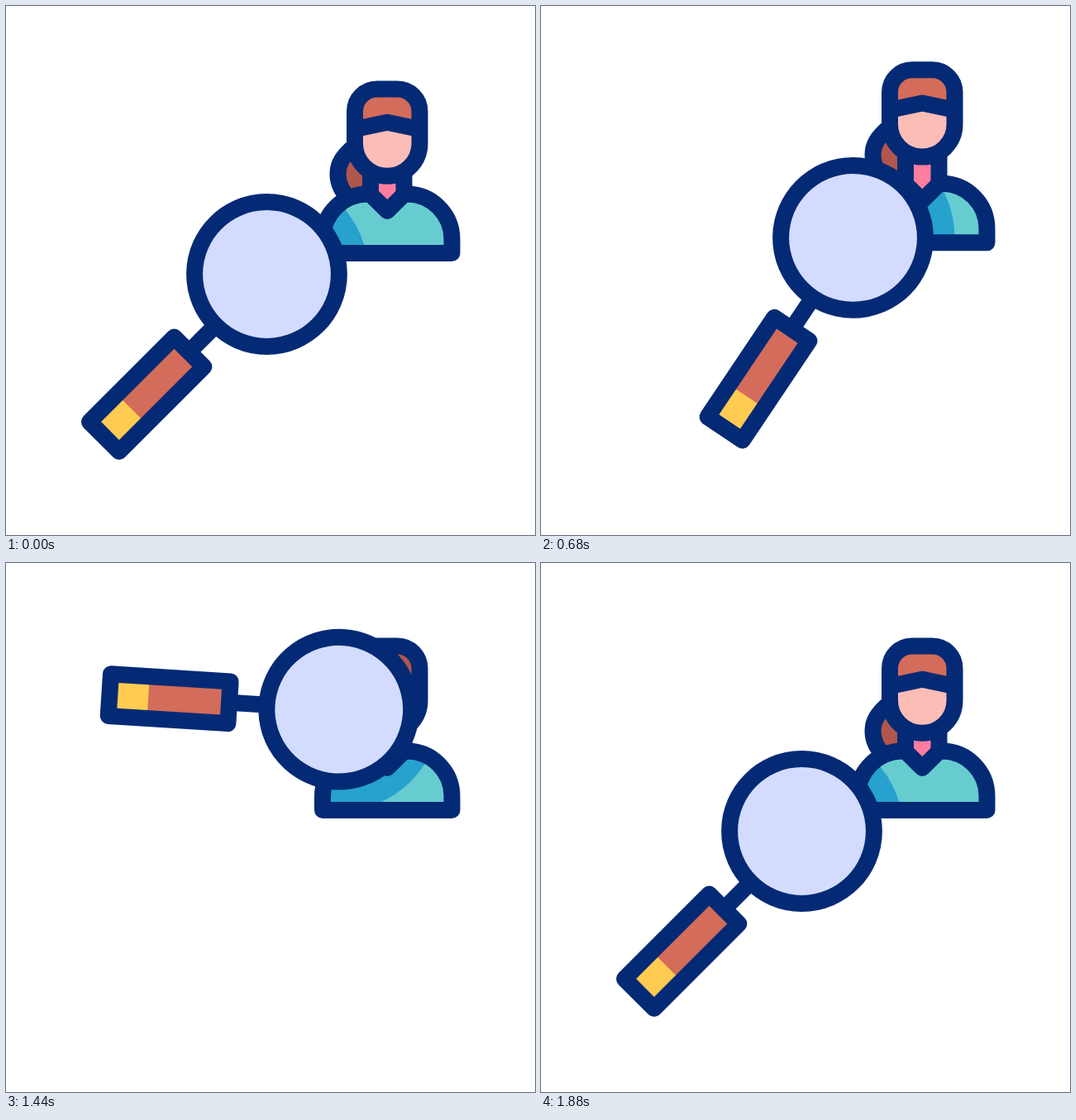
An HTML page with a canvas for the animation above (1920 ms loop, 640x640 px).

```html
<!DOCTYPE html>
<html lang="en">
<head>
<meta charset="utf-8">
<title>Search for a person</title>
<style>
  html, body { margin: 0; width: 100%; height: 100%; overflow: hidden; background: #fff; }
  canvas { display: block; width: 100vmin; height: 100vmin; }
</style>
</head>
<body>
<canvas id="stage"></canvas>
<script>
const LOOP = 1920;
const STEP = 40;
const SIZE = 640;
const SHADOW_RADIUS = 123;
const COLOR = {
  line: '#042a75', glass: '#d3dcfe', hair: '#d36c5a', hairDark: '#b0564c',
  skin: '#fdbdb7', skinDark: '#ff7d9f', shirt: '#67ccd0', shirtDark: '#27a1ce', cap: '#ffcb50'
};

const canvas = document.getElementById('stage');
const ctx = canvas.getContext('2d');

// Cubic Bezier easing with control points (x1, 0) and (x2, 1).
function ease(x, x1, x2) {
  let low = 0, high = 1;
  for (let i = 0; i < 24; i++) {
    const s = (low + high) / 2, r = 1 - s;
    if (3 * s * r * r * x1 + 3 * s * s * r * x2 + s * s * s < x) low = s; else high = s;
  }
  return low * low * (3 - 2 * low);
}

// Each segment: [start, end, from, to, x2 of the easing].
function valueAt(segments, time) {
  let value = segments[0][2];
  for (const [start, end, from, to, x2 = 0.33] of segments) {
    if (time < start) break;
    const k = time >= end ? 1 : ease((time - start) / (end - start), 0.42, x2);
    value = from.map((v, i) => v + (to[i] - v) * k);
  }
  return value;
}

// Glass poses: centre x, centre y, handle angle in degrees.
const CORNER = [315.5, 324.5, 45];
const CHEST = [377.5, 280.5, 56.2];
const FACE = [411, 163.3, -8.2];
const glassMotion = [
  [100, 400, CORNER, CHEST],
  [670, 1140, CHEST, FACE, 0.17],
  [1340, 1880, FACE, CORNER]
];

// Vertical offsets: head, body.
const personMotion = [
  [100, 400, [0, 0], [18.3, 12.9]],
  [400, 690, [18.3, 12.9], [-23.2, -12.7]],
  [690, 1000, [-23.2, -12.7], [0, 0]]
];

const tailPath = new Path2D('M421 170C407 182 401.5 191 401.5 203C401.5 216 407 224 414 232');
const tailFill = new Path2D('M421 170C407 182 401.5 191 401.5 203C401.5 216 407 224 414 232H445V170Z');
const neckFill = new Path2D('M441 170H481.5V228L461.25 248L441 228Z');
const neckLines = new Path2D('M441 170V228M481.5 170V228');
const bodyPath = new Path2D('M383 299V282A54.5 54.5 0 0 1 437.5 227.5H440.5L461.25 248L482 227.5H485' +
  'A54.5 54.5 0 0 1 539.5 282V299Z');
const headPath = new Path2D('M422 166.5V127.5A27 27 0 0 1 449 100.5H473.5A27 27 0 0 1 500.5 127.5' +
  'V166.5A39.25 39.25 0 0 1 422 166.5Z');
const hairFill = new Path2D('M422 127.5A27 27 0 0 1 449 100.5H473.5A27 27 0 0 1 500.5 127.5' +
  'V149L461.25 140.7L422 149Z');
const fringePath = new Path2D('M422 149L461.25 140.7L500.5 149');

function outline(path) {
  ctx.strokeStyle = COLOR.line;
  ctx.stroke(path);
}

function shadedFill(path, light, dark, shadow) {
  ctx.fillStyle = light;
  ctx.fill(path);
  ctx.save();
  ctx.clip(path);
  ctx.fillStyle = dark;
  ctx.beginPath();
  ctx.arc(shadow.x, shadow.y, SHADOW_RADIUS, 0, Math.PI * 2);
  ctx.fill();
  ctx.restore();
}

function shifted(dy, glass, draw) {
  ctx.save();
  ctx.translate(0, dy);
  draw({ x: glass[0], y: glass[1] - dy });
  ctx.restore();
}

function drawPerson(headY, bodyY, glass) {
  shifted(headY, glass, () => {
    ctx.fillStyle = COLOR.hairDark;
    ctx.fill(tailFill);
    outline(tailPath);
  });
  shifted(bodyY, glass, shadow => {
    ctx.fillStyle = COLOR.skinDark;
    ctx.fill(neckFill);
    outline(neckLines);
    shadedFill(bodyPath, COLOR.shirt, COLOR.shirtDark, shadow);
    outline(bodyPath);
  });
  shifted(headY, glass, shadow => {
    shadedFill(headPath, COLOR.skin, COLOR.skinDark, shadow);
    shadedFill(hairFill, COLOR.hair, COLOR.hairDark, shadow);
    outline(fringePath);
    outline(headPath);
  });
}

function drawGlass([x, y, angle]) {
  ctx.save();
  ctx.translate(x, y);
  ctx.rotate(-angle * Math.PI / 180);
  ctx.strokeStyle = COLOR.line;

  ctx.beginPath();
  ctx.moveTo(-90, 0);
  ctx.lineTo(-133, 0);
  ctx.stroke();

  ctx.fillStyle = COLOR.hair;
  ctx.fillRect(-278, -25.4, 145, 50.8);
  ctx.fillStyle = COLOR.cap;
  ctx.fillRect(-278, -25.4, 47, 50.8);
  ctx.strokeRect(-278, -25.4, 145, 50.8);

  ctx.fillStyle = COLOR.glass;
  ctx.beginPath();
  ctx.arc(0, 0, 87.4, 0, Math.PI * 2);
  ctx.fill();
  ctx.stroke();
  ctx.restore();
}

function render(time) {
  const scale = canvas.width / SIZE;
  ctx.setTransform(scale, 0, 0, scale, 0, 0);
  ctx.fillStyle = '#fff';
  ctx.fillRect(0, 0, SIZE, SIZE);
  ctx.lineWidth = 20;
  ctx.lineJoin = 'round';
  ctx.lineCap = 'butt';
  const glass = valueAt(glassMotion, time);
  const [headY, bodyY] = valueAt(personMotion, time);
  drawPerson(headY, bodyY, glass);
  drawGlass(glass);
}

function resize() {
  const side = Math.min(innerWidth, innerHeight) || SIZE;
  canvas.width = canvas.height = Math.round(side * (window.devicePixelRatio || 1));
}

function tick() {
  const time = performance.now() % LOOP;
  render(Math.floor(time / STEP) * STEP);
  requestAnimationFrame(tick);
}

addEventListener('resize', resize);
resize();
tick();
</script>
</body>
</html>
```
